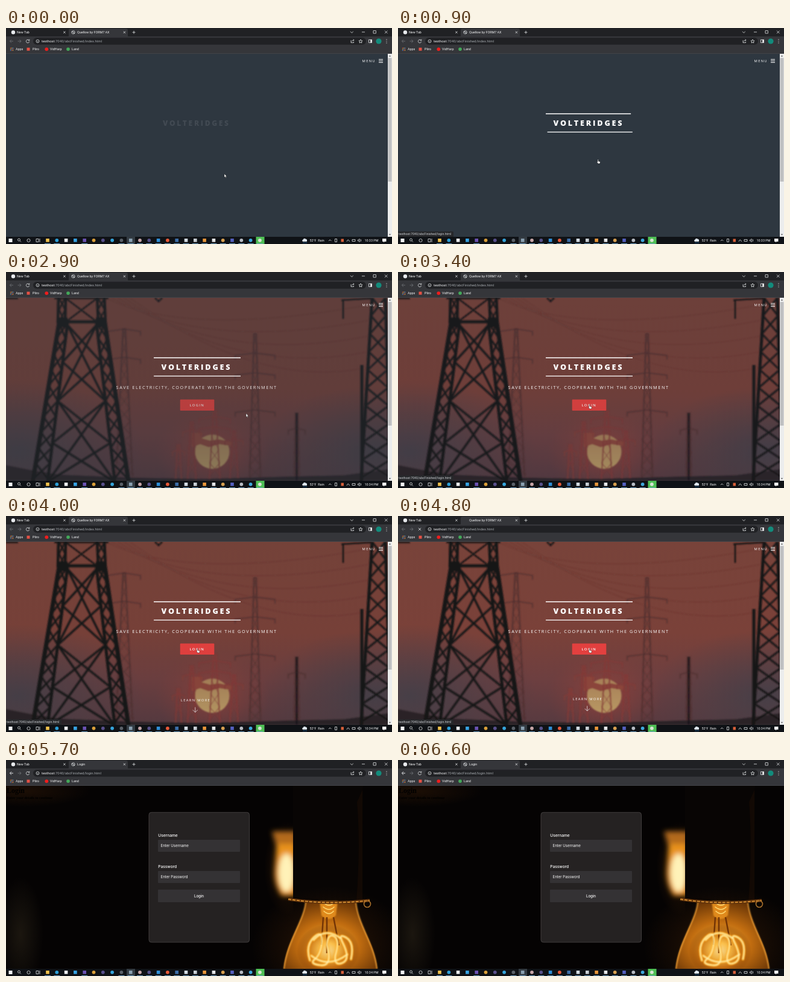
These frames come from a looping animation (640x360 px, 6.7 s). An HTML page:

```html
<!DOCTYPE html>
<html lang="en">
<head>
<meta charset="utf-8">
<title>Grid landing page</title>
<style>
html, body { margin: 0; width: 100%; height: 100%; overflow: hidden; background: #2e3740; }
svg { display: block; width: 640px; height: 360px; }
text { font-family: "Open Sans", "Noto Sans", sans-serif; fill: #fff; }
.ui text { font: 5.4px Roboto, "Open Sans", sans-serif; fill: #f6f7f8; }
.ui .dim { fill: #a2a7ac; }
.line { fill: none; stroke: #e4e6e8; stroke-width: .8; }
.caps { letter-spacing: .225em; }
.form text { font-family: Inter, "Open Sans", sans-serif; }

/* Landing page: runs 50 ms ahead of the loop; its wrap is hidden by the login page */
.intro { animation: 6.7s ease -50ms infinite both; transform-box: fill-box; transform-origin: center; }
.title { animation-name: title; }
.rule { animation-name: rule; transform-origin: left; }
.rule.right { transform-origin: right; }
.reveal { animation-name: reveal; }
.lead { animation-name: lead; }
.more { animation-name: more; }
@keyframes title { 0% { opacity: 0; transform: scale(.95); } 7.46%, 100% { opacity: 1; transform: none; } }
@keyframes rule { 0%, 3.73% { transform: scaleX(0); } 16.42%, 100% { transform: none; } }
@keyframes reveal { 0%, 26.12% { opacity: 0; } 70.9%, 100% { opacity: 1; } }
@keyframes lead { 0%, 29.85% { opacity: 0; } 54%, 100% { opacity: 1; } }
@keyframes more { 0%, 52.24% { opacity: 0; transform: translateY(49px); } 63.43%, 100% { opacity: 1; transform: none; } }

/* Hard switches */
.sw { animation: 6.7s step-end infinite both; }
.home { animation-name: home; }
.login { animation-name: login; }
.idle { animation-name: idle; }
.busy { animation-name: busy; }
.early { animation-name: early; }
.late { animation-name: late; }
.status { animation-name: status; }
.arrow { animation-name: arrow; }
.hand { animation-name: hand; }
@keyframes home { 0% { opacity: 1; } 73.1%, 100% { opacity: 0; } }
@keyframes login { 0% { opacity: 0; } 73.1%, 100% { opacity: 1; } }
@keyframes idle { 0% { opacity: 1; } 70.1% { opacity: 0; } 73.1%, 100% { opacity: 1; } }
@keyframes busy { 0% { opacity: 0; } 70.1% { opacity: 1; } 73.1%, 100% { opacity: 0; } }
@keyframes early { 0% { opacity: 1; } 23.8%, 100% { opacity: 0; } }
@keyframes late { 0% { opacity: 0; } 23.8%, 100% { opacity: 1; } }
@keyframes status { 0% { opacity: 0; } 11.9% { opacity: 1; } 22.3% { opacity: 0; } 48.5% { opacity: 1; } 82%, 100% { opacity: 0; } }
@keyframes arrow { 0% { opacity: 1; } 9% { opacity: 0; } 20.5% { opacity: 1; } 47%, 100% { opacity: 0; } }
@keyframes hand { 0% { opacity: 0; } 9% { opacity: 1; } 20.5% { opacity: 0; } 47% { opacity: 1; } 82%, 100% { opacity: 0; } }
.pointer { animation: move 6.7s ease-in-out infinite; }
@keyframes move {
  0% { transform: translate(362px, 243px); }
  10.45%, 19.4% { transform: translate(331px, 219px); }
  29.85%, 37.3% { transform: translate(533px, 260px); }
  47.76%, 100% { transform: translate(317px, 221px); }
}
</style>
</head>
<body>
<svg viewBox="0 0 640 360">
  <defs>
    <linearGradient id="sky" x2="0" y2="1">
      <stop offset="0" stop-color="#78433a"/><stop offset=".5" stop-color="#7a4139"/>
      <stop offset=".75" stop-color="#6d3f40"/><stop offset="1" stop-color="#573a40"/>
    </linearGradient>
    <radialGradient id="haze"><stop offset="0" stop-color="#473f47"/><stop offset="1" stop-color="#473f47" stop-opacity="0"/></radialGradient>
    <radialGradient id="glow"><stop offset="0" stop-color="#a5423a" stop-opacity=".65"/><stop offset="1" stop-color="#8a4038" stop-opacity="0"/></radialGradient>
    <linearGradient id="sun" x2="0" y2="1"><stop offset="0" stop-color="#a77f58"/><stop offset="1" stop-color="#b89863"/></linearGradient>
    <radialGradient id="halo"><stop offset="0" stop-color="#fff6c0"/><stop offset=".3" stop-color="#ffcb58"/><stop offset=".65" stop-color="#c86f10"/><stop offset="1" stop-color="#5a2804" stop-opacity="0"/></radialGradient>
    <radialGradient id="amber" cx=".48" cy=".62" r=".72"><stop offset="0" stop-color="#f5ae35"/><stop offset=".45" stop-color="#c06c10"/><stop offset="1" stop-color="#542804"/></radialGradient>
    <radialGradient id="brown"><stop offset="0" stop-color="#2b1606"/><stop offset="1" stop-color="#2b1606" stop-opacity="0"/></radialGradient>
    <radialGradient id="dusk"><stop offset="0" stop-color="#1b160f"/><stop offset="1" stop-color="#1b160f" stop-opacity="0"/></radialGradient>
    <filter id="soft"><feGaussianBlur stdDeviation=".9"/></filter>
    <filter id="wide" x="-50%" y="-50%" width="200%" height="200%"><feGaussianBlur stdDeviation="4"/></filter>
    <clipPath id="page"><rect y="43" width="640" height="305"/></clipPath>
    <clipPath id="behind"><rect x="400" y="43" width="76" height="305"/></clipPath>
  </defs>

  <g clip-path="url(#page)">
    <rect y="43" width="640" height="305" fill="#2e3740"/>
    <g class="intro reveal">
      <rect y="43" width="640" height="305" fill="url(#sky)"/>
      <ellipse cx="20" cy="300" rx="210" ry="120" fill="url(#haze)"/>
      <ellipse cx="610" cy="300" rx="190" ry="110" fill="url(#haze)"/>
      <ellipse cx="342" cy="300" rx="95" ry="75" fill="url(#glow)"/>
      <g filter="url(#soft)">
        <circle cx="342" cy="299.5" r="28.5" fill="url(#sun)"/>
        <path d="M308 268h18l-2 9 14 4 16-2 20 4v7l-20-3-18 5-14-5-14 5z" fill="#8b443b"/>
        <g id="far" fill="none"/>
        <path d="M0 322L40 330 90 338 210 343 330 345 470 341 560 339 640 328V348H0z" fill="#2a2225"/>
        <g id="near" fill="none" stroke="#191517"/>
      </g>
    </g>
    <g class="intro title">
      <text class="caps" x="257.5" y="163.2" font-size="12.6" font-weight="800">VOLTERIDGES</text>
    </g>
    <rect class="intro rule" x="245" y="142.2" width="144" height="1.5" fill="#fff"/>
    <rect class="intro rule right" x="245" y="172.8" width="144" height="1.3" fill="#fff"/>
    <g class="intro lead">
      <text class="caps" x="182.6" y="194.6" font-size="7.25">SAVE ELECTRICITY, COOPERATE WITH THE GOVERNMENT</text>
    </g>
    <g class="intro reveal">
      <rect x="288.7" y="212.5" width="56.6" height="18.5" rx="1" fill="#e3403f"/>
      <text class="caps" x="304.5" y="224" font-size="5.8" font-weight="600">LOGIN</text>
    </g>
    <g class="intro more">
      <text class="caps" x="289.8" y="307" font-size="5.85">LEARN MORE</text>
      <path class="line" d="M313.7 316.5v8.5m-4-4l4 4 4-4" stroke="#fff"/>
    </g>
    <text class="caps" x="590.6" y="57" font-size="5.8">MENU</text>
    <path d="M618 52.3h7M618 54.9h7M618 57.5h7" stroke="#fff" stroke-width="1"/>
    <rect x="633" y="43" width="7" height="305" fill="#eceded"/>
    <rect x="633.5" y="50" width="6" height="206" fill="#bfc0c1"/>
    <path d="M634.8 47.6l1.7-2 1.7 2zM634.8 343.6l1.7 2 1.7-2z" fill="#505050"/>

    <g class="sw login">
      <rect y="43" width="640" height="305" fill="#050303"/>
      <ellipse cx="30" cy="52" rx="110" ry="26" fill="url(#brown)" opacity=".6"/>
      <ellipse cx="24" cy="290" rx="38" ry="95" fill="url(#dusk)"/>
      <text x="1" y="55" style="font: bold 12px 'Liberation Serif', serif; fill: #000">Login</text>
      <text x="1" y="65" style="font: bold 6px 'Liberation Serif', serif; fill: #000">Enter your details to continue</text>
      <g clip-path="url(#behind)">
        <ellipse cx="466" cy="180" rx="38" ry="78" fill="url(#brown)"/>
        <g filter="url(#wide)">
          <path d="M441 119h40v23h-33z" fill="#b36b1c"/>
          <path d="M449 140h32v86h-24q-14-20-11-48z" fill="#e8921e"/>
          <ellipse cx="465" cy="188" rx="13" ry="32" fill="#fff2b8"/>
        </g>
      </g>
      <path d="M476 43V229L590 236 592 43z" fill="#080504"/>
      <path d="M581 235Q588 140 582 70l9-20v186z" fill="#120904"/>
      <ellipse cx="537" cy="310" rx="130" ry="100" fill="url(#brown)"/>
      <path d="M497 236C494 268 464 302 460 349H616C612 305 584 276 580 236z" fill="url(#amber)"/>
      <path d="M497 237C494 268 466 302 461 348M580 237C584 276 610 305 615 348" fill="none" stroke="#eda038" stroke-width="1.8" filter="url(#soft)"/>
      <ellipse cx="534" cy="318" rx="52" ry="44" fill="url(#halo)" opacity=".65"/>
      <path d="M520 235h30l-3 24q-12 12-24 0z" fill="#e08a1c" filter="url(#soft)"/>
      <path d="M526 262l-3 46m20-46l9 47m-20-47v60" stroke="#733506" stroke-width="2.5"/>
      <g id="filament" fill="none" stroke-linecap="round"/>
      <path d="M468 232Q535 242 603 234" fill="none" stroke="#5c300b" stroke-width="5"/>
      <path d="M468 232Q535 242 603 234" fill="none" stroke="#d08a30" stroke-width="2" stroke-dasharray="5 2"/>
      <circle cx="599" cy="240" r="5.5" fill="none" stroke="#a9702c" stroke-width="1.6"/>
      <g class="form">
        <rect x="237" y="87.3" width="166.5" height="216.5" rx="4" fill="#252222" stroke="#4c4848" stroke-width=".8"/>
        <g fill="#343234"><rect x="252" y="133" width="136" height="20" rx="1"/><rect x="252" y="185" width="136" height="20" rx="1"/><rect x="252" y="216" width="136" height="21" rx="1"/></g>
        <text x="252.3" y="127.5" font-size="6.6" font-weight="500">Username</text>
        <text x="256.5" y="144.8" font-size="6.1">Enter Username</text>
        <text x="252.3" y="179.5" font-size="6.6" font-weight="500">Password</text>
        <text x="256.5" y="196.8" font-size="6.1">Enter Password</text>
        <text x="320" y="228.6" font-size="6.1" font-weight="500" text-anchor="middle">Login</text>
      </g>
    </g>
  </g>

  <g class="ui">
    <g class="sw status">
      <path d="M0 339h90q2 0 2 2v7H0z" fill="#27282b"/>
      <text x="1" y="345.3" style="font-size: 5.2px; fill: #ccd0d4">testhost:7040/abcFinished/login.html</text>
    </g>

    <rect width="640" height="15" fill="#202124"/>
    <path d="M102 15q2 0 2-3V4q0-3 3-3h92q3 0 3 3v8q0 3 2 3z" fill="#35363a"/>
    <rect y="14" width="640" height="29" fill="#35363a"/>
    <rect x="45" y="16.3" width="552" height="11.4" rx="5.7" fill="#202124"/>
    <rect y="42.3" width="640" height=".7" fill="#484a4e"/>
    <circle cx="12" cy="7.2" r="3.2" fill="#e8eaed"/>
    <text x="18" y="9">New Tab</text>
    <g class="sw idle"><circle cx="111.5" cy="7.2" r="2.7" class="line"/><path class="line" d="M109 6.5h3v2h2"/></g>
    <text class="sw home" x="118" y="9">Quellow by FORM7 AX</text>
    <text class="sw login" x="118" y="9">Login</text>
    <path class="line" d="M95.2 5.5l3.4 3.4m0-3.4l-3.4 3.4M194.7 5.5l3.4 3.4m0-3.4l-3.4 3.4M209.5 7.2h5m-2.5-2.5v5M571 5.8l2.4 2.4 2.4-2.4M590 6.8h5M609 4.5h4.4v4.4H609zM628 4.5l4.6 4.6m0-4.6L628 9.1"/>
    <path class="line" d="M12 22H6.5m2.5-2.6L6.4 22 9 24.6M19.5 22H25m-2.5-2.6l2.6 2.6-2.6 2.6" style="stroke: #74777b"/>
    <path class="line sw login" d="M12 22H6.5m2.5-2.6L6.4 22 9 24.6"/>
    <path class="line sw idle" d="M38.3 20.6a2.7 2.7 0 1 0 .4 2.2m.1-4v2.1h-2.1"/>
    <path class="line sw busy" d="M33.8 19.8l4.4 4.4m0-4.4l-4.4 4.4"/>
    <circle class="line" cx="52.5" cy="22" r="2.5"/><path class="line" d="M52.5 21.6v1.8"/>
    <g style="font-size: 5.9px">
      <text class="dim sw home" x="59" y="24" style="font-size: inherit"><tspan fill="#f2f3f5">testhost</tspan>:7040/abcFinished/index.html</text>
      <text class="dim sw login" x="59" y="24" style="font-size: inherit"><tspan fill="#f2f3f5">testhost</tspan>:7040/abcFinished/login.html</text>
    </g>
    <path class="line" d="M572 20.5v4h4.5v-1.7m-3-.3q.5-2.3 3.5-2.3m-1.4-1.4l1.5 1.4-1.5 1.4"/>
    <path class="line" d="M588 19l.9 2.1 2.2.2-1.7 1.5.6 2.2-2-1.2-2 1.2.6-2.2-1.7-1.5 2.2-.2z"/>
    <path class="line" d="M601.5 19.5h5v5h-5z"/><path d="M604.2 19.5h2.3v5h-2.3z" fill="#eee"/>
    <circle cx="618" cy="22" r="4.6" fill="#138c7c"/>
    <path d="M631 19.2v.1m0 2.7v.1m0 2.7v.1" stroke="#e0e0e0" stroke-width="1.2" stroke-linecap="round"/>
    <g id="apps"></g>
    <text x="16" y="37.3">Apps</text>
    <rect x="34.5" y="32.8" width="5" height="5" fill="#e45145"/><text x="44" y="37.3">Pliro</text>
    <circle cx="67.3" cy="35.3" r="2.9" fill="#ee1d1d"/><text x="73" y="37.3">VidHarp</text>
    <circle cx="103" cy="35.3" r="2.8" fill="#43a85a"/><text x="109" y="37.3">Land</text>

    <rect y="348" width="640" height="12" fill="#0f1216"/>
    <g id="bar"></g>
    <path class="line" d="M23.5 353a2 2 0 1 0-4 0a2 2 0 1 0 4 0m-.6 1.5l2 2"/>
    <circle class="line" cx="37.5" cy="354" r="2.6"/>
    <path class="line" d="M50 351.5h4v5h-4zM56 351v6"/>
    <path d="M492 356q-2-2 .6-3.4q1.4-3 4.2-1q3.2.3 2 4.4z" fill="#dce5ee"/>
    <path d="M493.5 357l-.6 1.6m3-1.6l-.6 1.6m3-1.6l-.6 1.6" stroke="#3a96e0" stroke-width=".8"/>
    <text x="503.5" y="356">52°F&#160; Rain</text>
    <path class="line" d="M535 355l2.2-2.2 2.2 2.2M545.5 351.5h3v5h-3zM565 356q2.2-6 4.5 0M574 352.5h5v3h-5zM583.5 353v2h1l1.7 1.5v-5l-1.7 1.5zM588 352q1.5 2 0 4"/>
    <rect x="555.5" y="351.5" width="4.5" height="5" fill="#d8603a"/>
    <text class="sw early" x="594.5" y="356">10:33 PM</text>
    <text class="sw late" x="594.5" y="356">10:34 PM</text>
    <path d="M624 351h6.5v5h-3l-1.5 1.6V356h-2z" fill="#f2f2f2"/>
  </g>

  <g class="pointer">
    <path class="sw arrow" d="M0 0v6l1.4-1.2.9 2 .9-.4-.9-2H4z" fill="#fff" stroke="#111" stroke-width=".4"/>
    <path class="sw hand" d="M0 .6q.7-1 1.2 0V3l2.6.7q.6.3.4 1L3.6 7H.8L-1.2 4.4q.2-.9 1.2-.2z" fill="#fff" stroke="#111" stroke-width=".4"/>
  </g>
</svg>

<script>
const NS = "http://www.w3.org/2000/svg";
function add(id, tag, attrs) {
  const el = document.createElementNS(NS, tag);
  for (const key in attrs) el.setAttribute(key, attrs[key]);
  document.getElementById(id).append(el);
}
const stroke = (id, d, width, extra) => add(id, "path", { d, "stroke-width": width, ...extra });

// Lattice between two legs, given as functions of y
function lattice(id, left, right, levels, width, extra) {
  for (let i = 1; i < levels.length; i++) {
    const a = levels[i - 1], b = levels[i];
    stroke(id, `M${left(a)} ${a}L${right(b)} ${b}M${right(a)} ${a}L${left(b)} ${b}`, width, extra);
  }
}
const slope = (x, y, k) => v => x + (v - y) * k;
const range = (from, to, step) => Array.from({ length: Math.floor((to - from) / step) + 1 }, (_, i) => from + i * step);
const leg = (f, top, width) => stroke("near", `M${f(top)} ${top}L${f(350)} 350`, width);

// Large tower on the left: each leg is a lattice of its own
const outL = slope(88, 85, -.165), inL = slope(102, 85, -.125);
const outR = slope(164, 85, .148), inR = slope(150, 85, .115);
[[outL, 7], [inL, 5], [outR, 7], [inR, 5]].forEach(([f, w]) => leg(f, 85, w));
lattice("near", outL, inL, range(85, 350, 26), 3);
lattice("near", inR, outR, range(85, 350, 26), 3);
lattice("near", inL, inR, [88, 150, 215, 285, 350], 3.5);
lattice("near", inL, inR, [88, 215, 350], 3.5);
stroke("near", "M84 83H167", 5);
stroke("near", "M95 76V92M156 76V92", 14);
stroke("near", "M87 40L86 85M99 40L98 85M151 40L153 85M163 40L165 85", 4.5);
lattice("near", slope(88, 43, 0), slope(98, 43, 0), [43, 63, 84], 2.5);
lattice("near", slope(152, 43, 0), slope(164, 43, 0), [43, 63, 84], 2.5);
lattice("near", slope(98, 43, 0), slope(152, 43, 0), [43, 84], 2.5);
stroke("near", "M0 44H20M80 44H170M247 43l6 6 6-6", 2.5);

// Tower on the right
const farL = slope(607, 43, -.06), farR = slope(629, 43, .03);
leg(farL, 43, 5);
leg(farR, 43, 5);
lattice("near", farL, farR, range(43, 350, 30), 3);
stroke("near", "M556 47L606 44M559 47V78", 2.5);
stroke("near", "M590 155V348", 5);
stroke("near", "M482 235V348", 4, { opacity: .75 });

// Distant pylons: x, top, half base, arm heights, arm half length
function pylon(x, top, half, arms, len, color) {
  const look = { stroke: color, opacity: .7 };
  stroke("far", `M${x - half} 348L${x - 2} ${top}H${x + 2}L${x + half} 348`, 2.6, look);
  lattice("far", slope(x - 2, top, -half / (350 - top)), slope(x + 2, top, half / (350 - top)), range(top, 348, 22), 1.2, look);
  for (const y of arms) stroke("far", `M${x - len} ${y + 9}V${y + 2}L${x} ${y - 2}L${x + len} ${y + 2}V${y + 9}`, 2, look);
}
const dark = "#50302f", red = "#853a37";
pylon(413, 103, 9, [137, 170, 232], 33, dark);
pylon(196, 95, 14, [97, 144], 27, dark);
pylon(482, 235, 4, [262], 14, dark);
pylon(346, 230, 9, [243, 260], 26, red);
pylon(308, 250, 7, [265], 15, red);
pylon(286, 288, 5, [298], 10, red);
pylon(378, 265, 7, [280], 15, red);
for (let i = 0; i < 5; i++)
  stroke("far", `M${165 + i * 10} 43Q${300 + i * 30} ${110 + i * 22} 600 ${55 + i * 26}`, .8, { stroke: dark, opacity: .25 });

// Glowing wire: wide glow, then a bright core
const wire = "M504 334q-8-24 6-38t14 6q-2 22-12 30t10 10 10-34q2-20 12-14t2 32q-2 18 12 12t0-34q-8-16 6-8t8 36M510 300q20-22 46-2M506 326q28 22 60-2";
[["#ff9d18", 5, .6], ["#ffd45c", 2.6, .9], ["#fff6c8", 1.2, 1]].forEach(([color, w, opacity]) => stroke("filament", wire, w, { stroke: color, opacity, filter: "url(#soft)" }));
stroke("filament", "M526 238q10 8 18 0M526 245q10 8 18 0M527 252q9 8 16 0", 1.5, { stroke: "#ffdc78" });

// Bookmark grid
const dots = ["#e0574a", "#e9b13c", "#4e9be6"];
for (let i = 0; i < 9; i++)
  add("apps", "rect", { x: 7 + i % 3 * 2, y: 32.8 + Math.floor(i / 3) * 2, width: 1.2, height: 1.2, fill: dots[(i + Math.floor(i / 3)) % 3] });

// Taskbar buttons: shape (s square, c circle) and colour
add("bar", "rect", { x: 4.5, y: 351, width: 6, height: 6, fill: "#f2f4f6" });
add("bar", "rect", { x: 200, y: 348, width: 14, height: 12, fill: "#333b42" });
add("bar", "rect", { x: 414.5, y: 348, width: 14, height: 12, fill: "#4fbf55" });
const buttons = "s#f0c14c c#2c9fd8 s#eef0f2 s#38a3e4 s#6b52b4 c#dba03a c#59508c c#35a5dc c#5a6068 s#8aa0b0 c#c8a6a8 c#57518a s#2f8fd8 c#ea5a38 s#3c6ea8 s#d3dbe2 s#c8ced4 s#e8963a s#e4e6e8 c#d8a050 s#5560c0 c#b8bcc4 c#3fa8dc c#d9e4d4".split(" ");
buttons.forEach((item, i) => {
  const x = 69 + i * 15.3, fill = item.slice(1);
  if (item[0] === "c") add("bar", "circle", { cx: x, cy: 353.8, r: 2.9, fill });
  else add("bar", "rect", { x: x - 2.8, y: 351, width: 5.6, height: 5.6, fill });
  if (i < 2 || i === 4 || i > 7) add("bar", "rect", { x: x - 5, y: 359, width: 10, height: 1, fill: "#6d9fc4" });
});
</script>
</body>
</html>
```
